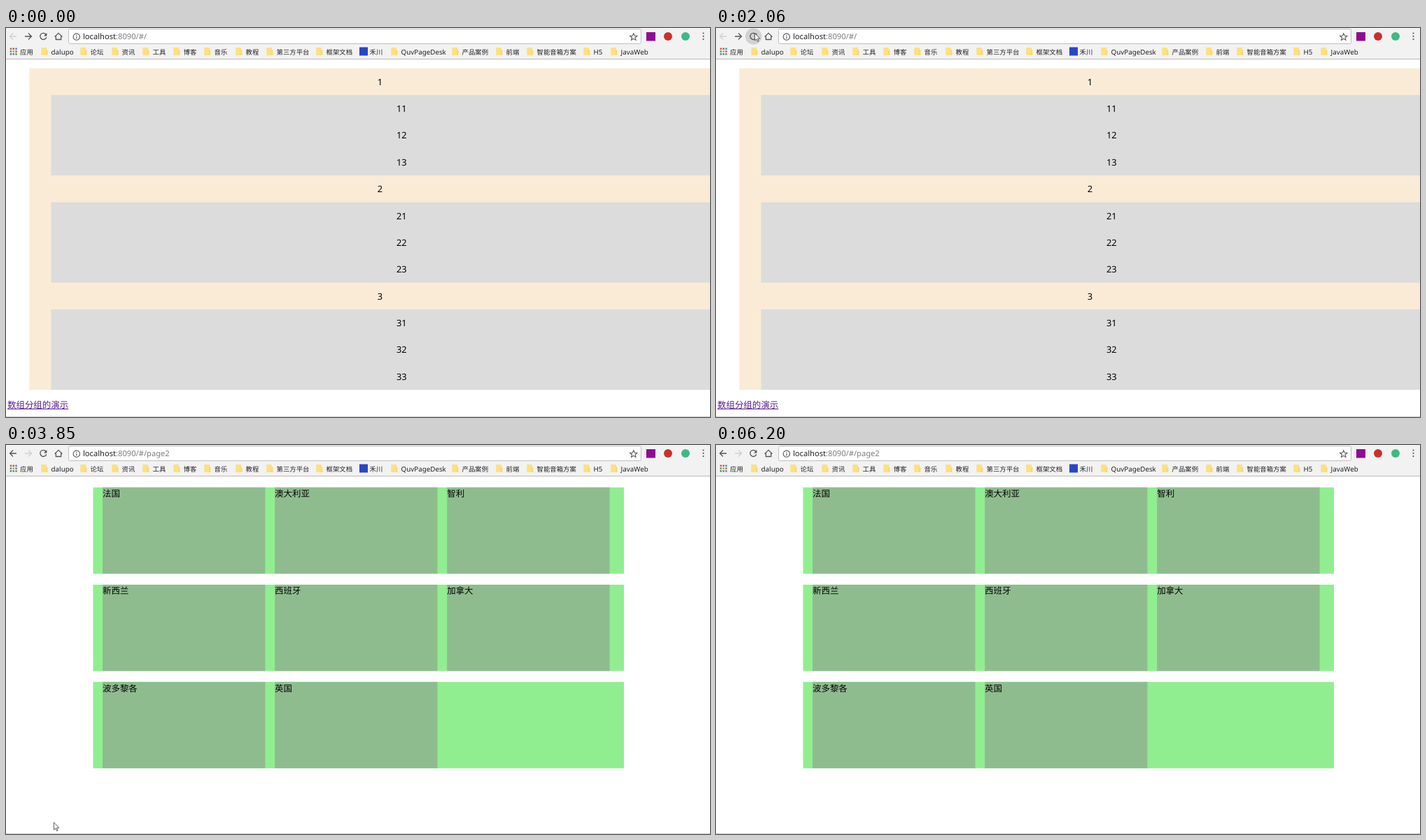
An HTML page for the animation above (7.36 s loop, 1006 px wide and 557 px high).

```html
<!DOCTYPE html>
<html lang="zh-CN">
<head>
<meta charset="utf-8">
<title>数组分组的演示</title>
<style>
html, body { margin: 0; width: 100%; height: 100%; overflow: hidden; background: #fff; }
svg { display: block; width: 100%; height: 100%; }
text { font: 12.45px "Noto Sans", "Noto Sans CJK SC", "Noto Sans CJK", sans-serif; text-rendering: geometricPrecision; white-space: pre; }
.cjk { font-family: "Noto Sans CJK SC", "Noto Sans CJK", sans-serif; }
.mark { font-size: 9.4px; fill: #222; }
.latin { font-size: 9.8px; }
.num { font-size: 12.8px; text-anchor: middle; }
.url { font-size: 11.15px; fill: #222; }
.url .dim { fill: #7c7c7c; }
.line { fill: none; stroke: #555; stroke-width: 1.3; }
</style>
</head>
<body>
<svg viewBox="0 0 1006 557">
  <g id="list"></g>
  <g id="grid"></g>
  <path d="M0 556.5H1006" stroke="#d0d0d0"/>

  <g id="chrome">
    <path d="M0 0H1006V44H0Z" fill="#f2f2f2"/>
    <path d="M0 44.5H1006" stroke="#b9b9b9"/>
    <rect x="89.5" y="1.5" width="818" height="21" rx="2" fill="#fff" stroke="#bdbdbd"/>
    <circle id="press" cx="53.6" cy="12" r="11.8" fill="#d2d2d2"/>
    <path id="back" class="line" d="M15 12H5.7M10 7.5L5.5 12L10 16.5"/>
    <path id="next" class="line" d="M27 12H36.3M32 7.5L36.5 12L32 16.5"/>
    <path class="line" d="M57 9A4.6 4.6 0 1 0 57.8 13.3"/>
    <path d="M58.4 7V11.4H54Z" fill="#555"/>
    <path class="line" d="M69.5 12.6L75 7.3L80.5 12.6M71.3 11.5V16.5H78.7V11.5"/>
    <circle class="line" style="stroke-width:1.1" cx="100.8" cy="12.6" r="4.7"/>
    <path d="M100.8 10V11.2M100.8 12.2V15.3" stroke="#555" stroke-width="1.2"/>
    <text class="url" x="110" y="16">localhost<tspan class="dim" id="path"></tspan></text>
    <path id="star" class="line" style="stroke-width:1.1"/>
    <rect x="915" y="6" width="13" height="12.5" fill="#8f0b93"/>
    <circle cx="946" cy="12" r="6" fill="#c9302c"/>
    <circle id="badge" cx="971" cy="12" r="6"/>
    <path d="M996.5 7.5V17" stroke="#555" stroke-width="2.2" stroke-linecap="round" stroke-dasharray="0 4.3"/>
  </g>

  <path id="arrow" d="M.4 .5V11L2.8 8.8L4.4 12.5L6 11.8L4.5 8.2H7.8Z" fill="#fff" stroke="#333" stroke-width=".8"/>
  <path id="beam" d="M-2.5-5.5H-.7L0-5L.7-5.5H2.5M-2.5 5.5H-.7L0 5L.7 5.5H2.5M0-5V5" fill="none" stroke="#4c5f4c" stroke-width=".9"/>
</svg>
<script>
const $ = id => document.getElementById(id);
const LOOP = 7360, EM = 12.45;
const rect = (x, y, w, h, fill) => `<rect x="${x}" y="${y}" width="${w}" height="${h}" fill="${fill}"/>`;
const add = (id, html) => $(id).insertAdjacentHTML('beforeend', html);

// Nested list page
const ROW = 38.37, TOP = 57.6;
let list = rect(33.3, TOP, 973, 12 * ROW, '#faebd7');
for (let i = 0; i < 12; i++) {
  const group = Math.floor(i / 4) + 1, item = i % 4;
  if (item === 1) list += rect(64.4, TOP + i * ROW, 942, 3 * ROW, '#dcdcdc');
  list += `<text class="num" x="${item ? 565.2 : 534.4}" y="${81.7 + i * ROW}">${group}${item || ''}</text>`;
}
list += `<g id="link"><text class="cjk" x="2" y="543.6">数组分组的演示</text>${rect(2, 545, 87.2, 1, 'currentColor')}</g>`;
add('list', list);

// Grouped grid page
const names = ['法国', '澳大利亚', '智利', '新西兰', '西班牙', '加拿大', '波多黎各', '英国'];
const cellX = i => 138 + (i % 3) * 246.1;
const cellY = i => 60.7 + Math.floor(i / 3) * 139.3;
for (let i = 0; i < 9; i += 3) add('grid', rect(124.4, cellY(i), 758.6, 123.6, '#90ee90'));
names.forEach((name, i) => add('grid', rect(cellX(i), cellY(i), 232.4, 123.6, '#8fbc8f') +
  `<rect class="hl" x="${cellX(i)}" y="${cellY(i)}" width="0" height="15.8" fill="#1e87e9"/>` +
  `<text class="cjk" x="${cellX(i)}" y="${cellY(i) + 13.4}"><tspan class="on" fill="#fff"></tspan><tspan class="off">${name}</tspan></text>`));
const highlights = [...document.querySelectorAll('.hl')];
const picked = [...document.querySelectorAll('.on')];
const plain = [...document.querySelectorAll('.off')];

// Bookmark bar
const marks = [[50, 'dalupo'], [106, '论坛'], [151, '资讯'], [195, '工具'], [239, '博客'], [283, '音乐'],
  [328, '教程'], [372, '第三方平台'], [443, '框架文档'], [505, '禾川'], [550, 'QuvPageDesk'], [637, '产品案例'],
  [700, '前端'], [744, '智能音箱方案'], [825, 'H5'], [864, 'JavaWeb']];
const label = (x, s) => `<text class="mark ${/^\w/.test(s) ? 'latin' : 'cjk'}" x="${x}" y="37.5">${s}</text>`;
const dots = ['#d9534f', '#777', '#4a86d8', '#4f9f5a', '#e0a030'];
for (let i = 0; i < 9; i++) add('chrome', rect(5.7 + i % 3 * 3.8, 28.5 + Math.floor(i / 3) * 3.8, 2.5, 2.5, dots[i % 5]));
add('chrome', label(20, '应用'));
for (const [x, s] of marks) {
  const icon = s === '禾川' ? rect(x, 27.5, 12, 12, '#2846c4')
    : `<path d="M${x + .3} 28H${x + 8}V31L${x + 9.6} 32V39H${x + .3}Z" fill="#fde07f"/><path d="M${x + 8} 32V39" stroke="#f4cf62" stroke-width=".8"/>`;
  add('chrome', icon + label(x + 14.6, s));
}
$('star').setAttribute('d', 'M' + Array.from({ length: 10 }, (_, i) => {
  const a = Math.PI * (i / 5 - .5), r = i % 2 ? 2.4 : 5.4;
  return `${896.8 + r * Math.cos(a)} ${13 + r * Math.sin(a)}`;
}).join('L') + 'Z');

// Pointer moves: first time, last time, number of steps, way points
const moves = [
  [330, 620, 5, [[736, 477], [37, 174]]],
  [1100, 1740, 9, [[5, 49], [22, 36], [52, 7]]],
  [1840, 1890, 2, [[53, 7], [55, 7]]],
  [2290, 2990, 10, [[55, 7], [51, 60], [56, 290], [66, 524]]],
  [3130, 3460, 5, [[66, 526], [64, 535], [68, 540]]],
  [3920, 4390, 7, [[90, 528], [400, 354]]],
  [4480, 4630, 3, [[398, 260], [386, 80]]],
  [4710, 5080, 6, [[450, 100], [640, 200], [660, 245], [632, 305]]],
  [5180, 5480, 5, [[632, 305], [632, 309], [632, 289]]],
  [5710, 6100, 6, [[632, 289], [760, 430], [915, 540]]]
];
// Selection end: time, cell, characters in that cell
const selections = [[0, 0, 0], [4710, 1, 4], [4790, 2, 2], [4860, 5, 3], [5000, 5, 1], [5080, 4, 3], [5710, 0, 0]];

const between = (t, a, b) => t >= a && t < b;
const last = (rows, t) => rows.filter(r => r[0] <= t).pop();

function pointer(t) {
  if (t < 330 || between(t, 700, 1100) || t >= 6200) return null;
  const [a, b, n, pts] = last(moves, t);
  const step = Math.min(n - 1, Math.floor((t - a) / (b - a) * (n - 1) + 1e-6));
  const u = step / (n - 1) * (pts.length - 1);
  const i = Math.min(pts.length - 2, Math.floor(u));
  return pts[i].map((v, k) => v + (pts[i + 1][k] - v) * (u - i));
}

function select(t) {
  const [, end, chars] = last(selections, t);
  names.forEach((name, i) => {
    const full = i > 0 && i < end;
    const n = full ? name.length : i === end ? chars : 0;
    highlights[i].setAttribute('width', n * EM + (full ? 3.8 : 0));
    picked[i].textContent = name.slice(0, n);
    plain[i].textContent = name.slice(n);
  });
}

const show = (id, on) => { $(id).style.display = on ? '' : 'none'; };

function draw(t) {
  const second = t >= 3850;
  show('list', !second);
  show('grid', second);
  $('path').textContent = second ? ':8090/#/page2' : ':8090/#/';
  $('back').style.stroke = second ? '#555' : '#d0d0d0';
  $('next').style.stroke = second ? '#d0d0d0' : '#555';
  const tint = t >= 3710 ? '#f00' : '#551a8b';
  $('link').style.color = $('link').style.fill = tint;
  show('press', between(t, 2060, 2120));
  $('badge').style.fill = between(t, 2120, 2368) ? '#b0b0b0' : '#41b883';
  select(t);

  const p = pointer(t), drag = between(t, 4630, 5180);
  show('arrow', p && !drag);
  show('beam', p && drag);
  if (p) $(drag ? 'beam' : 'arrow').setAttribute('transform', `translate(${p.map(Math.round)})`);
}

const start = performance.now();
function tick() {
  draw((performance.now() - start) % LOOP);
  requestAnimationFrame(tick);
}
tick();
</script>
</body>
</html>
```
